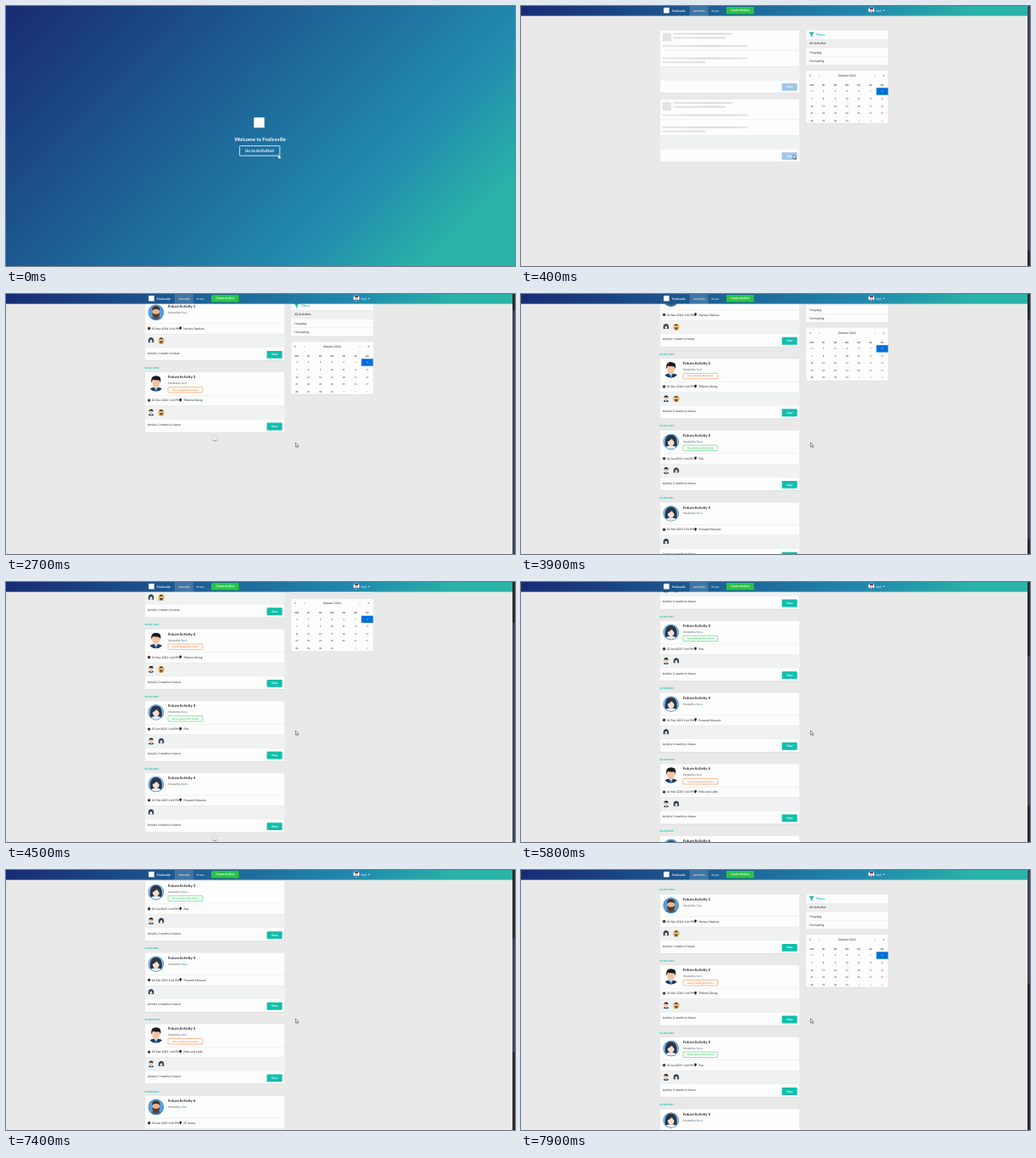
Animation, 600 px wide and 306 px high, one loop 8000 ms. Source, as an HTML page:

```html
<!DOCTYPE html>
<html lang="en">
<head>
<meta charset="utf-8">
<title>Activity feed</title>
<style>
  html, body { margin: 0; width: 100%; height: 100%; overflow: hidden; background: #e9e9e9; }
  svg { display: block; width: 600px; height: 306px; }
  text { font-family: Lato, "Open Sans", sans-serif; text-rendering: geometricPrecision; white-space: pre; }
</style>
</head>
<body>
<svg id="stage" viewBox="0 0 600 306" xmlns="http://www.w3.org/2000/svg"></svg>
<script>
(() => {
const W = 600, H = 306, PAGE_W = 597, LOOP = 8000;
const TEAL = '#10bfac', INK = '#222', LINK = '#4183c4', LINE = '#dcdddd';
const PAGE_AT = 350, FIRST_LOAD = 1500;

const stage = document.getElementById('stage');

function el(tag, attrs, parent = stage) {
  const node = document.createElementNS('http://www.w3.org/2000/svg', tag);
  for (const k in attrs) node.setAttribute(k, attrs[k]);
  parent.appendChild(node);
  return node;
}
const group = (parent, attrs = {}) => el('g', attrs, parent);
const rect = (p, x, y, width, height, fill, more = {}) =>
  el('rect', { x, y, width, height, fill, ...more }, p);
const circle = (p, cx, cy, r, fill, more = {}) => el('circle', { cx, cy, r, fill, ...more }, p);
const path = (p, d, fill, more = {}) => el('path', { d, fill, ...more }, p);
// y is the middle of the capitals
function text(p, x, y, str, size, fill = INK, weight = 400, anchor = 'start') {
  const node = el('text', { x, y: y + size * 0.36, 'font-size': size, fill,
    'font-weight': weight, 'text-anchor': anchor }, p);
  node.textContent = str;
  return node;
}
const show = (node, on) => { node.style.display = on ? '' : 'none'; };

// --- shared paint ---
const defs = el('defs', {});
function gradient(id, attrs, stops) {
  const g = el('linearGradient', { id, gradientUnits: 'userSpaceOnUse', ...attrs }, defs);
  for (const [offset, color] of stops) el('stop', { offset, 'stop-color': color }, g);
  return g;
}
// same geometry as a CSS gradient at 135deg
function diagonal(id, w, h) {
  const q = (w + h) / 4;
  gradient(id, { x1: w / 2 - q, y1: h / 2 - q, x2: w / 2 + q, y2: h / 2 + q },
    [[0, '#182a73'], [0.69, '#218aae'], [0.89, '#2ab3a8']]);
}
diagonal('hero', W, H);
diagonal('bar', PAGE_W, 11.6);
const shimmer = gradient('shimmer', { spreadMethod: 'repeat', y1: 0, y2: 0 },
  [[0, '#e3e3e3'], [0.15, '#dadada'], [0.3, '#e3e3e3'], [1, '#e3e3e3']]);
circle(el('clipPath', { id: 'round' }, defs), 0, 0, 1);

// --- avatars, drawn in a unit circle ---
function avatar(p, who, x, y, r, small) {
  const g = group(p, { transform: `translate(${x} ${y}) scale(${r})`, 'clip-path': 'url(#round)' });
  if (who === 'Ned') {
    path(g, 'M-.9 1C-.85 .55-.5 .45 0 .45S.85 .55 .9 1Z', '#1d3a66');
    path(g, 'M-.22 .4H.22L.12 .7 0 1-.12 .7Z', '#fff');
    path(g, 'M-.06 .55H.06L.1 1H-.1Z', '#2f86d0');
    el('ellipse', { cx: 0, cy: -0.1, rx: 0.47, ry: 0.6, fill: '#f3c5a0' }, g);
    path(g, 'M-.56-.1C-.7-.75-.35-1 .05-.97C.55-.98 .68-.6 .55-.1L.44-.4C.1-.4-.2-.45-.4-.5Z', '#1b1b22');
  } else if (who === 'Nora') {
    circle(g, 0, 0, 1, small ? '#c9d8e6' : '#8fc3ee');
    path(g, 'M-.72 .6C-.85-.3-.6-.85 0-.85S.85-.3 .72 .6Z', '#2c3646');
    path(g, 'M-.75 1C-.7 .6-.4 .5 0 .5S.7 .6 .75 1Z', '#e9eef4');
    el('ellipse', { cx: 0, cy: 0.02, rx: 0.42, ry: 0.52, fill: '#f6dfd2' }, g);
    path(g, 'M-.5 .05C-.45-.5-.1-.62 .15-.6C.4-.5 .5-.3 .5 .1C.3-.05 .2-.2 .1-.35C-.1-.15-.3-.05-.5 .05Z', '#2c3646');
  } else {
    circle(g, 0, 0, 1, small ? '#f0c77f' : '#5a9fdc');
    path(g, 'M-.8 1C-.75 .6-.4 .5 0 .5S.75 .6 .8 1Z', small ? '#b9a27c' : '#3f6286');
    el('ellipse', { cx: 0, cy: -0.05, rx: 0.45, ry: 0.6, fill: '#e9b78d' }, g);
    path(g, 'M-.47 0C-.5 .5-.25 .72 0 .72S.5 .5 .47 0C.3 .28-.3 .28-.47 0Z', '#5a3c28');
    path(g, 'M-.48-.2C-.55-.65-.3-.8 0-.8S.55-.65 .48-.2C.35-.5-.35-.5-.48-.2Z', '#4a3324');
  }
  if (who !== 'Ned' && !small)
    circle(g, 0, 0, 0.95, 'none', { stroke: '#4a8fd0', 'stroke-width': 0.1 });
}

// --- activity page ---
const page = group(stage);
rect(page, 0, 0, W, H, '#e9e9e9');
const scroller = group(page);

function box(p, x, y, w, h) {
  rect(p, x, y + 0.4, w, h, '#d0d1d1', { rx: 1 });
  rect(p, x, y, w, h, '#fdfdfd', { rx: 1, stroke: LINE, 'stroke-width': 0.3 });
}
const rule = (p, x, y, w) => rect(p, x, y, w, 0.35, LINE);

function button(p, x, y, w, h, label, fill) {
  rect(p, x, y, w, h, fill, { rx: 0.9 });
  text(p, x + w / 2, y + h / 2 - 0.1, label, 3.35, '#fff', 700, 'middle');
}

const CARD_X = 163.6, CARD_W = 165;
// host, place, month, label, guests
const items = [
  ['Max', 'Hartsey Stadium', 'Nov 2024', '', ['Nora', 'Max']],
  ['Ned', 'Tibbons Dining', 'Dec 2024', 'hosting', ['Ned', 'Max']],
  ['Nora', 'Pub', 'Jan 2025', 'going to', ['Ned', 'Nora']],
  ['Nora', 'Fenwold Museum', 'Feb 2025', '', ['Nora']],
  ['Ned', 'Mole and Ladle', 'Mar 2025', 'hosting', ['Ned', 'Nora']],
  ['Max', 'K7 Arena', 'Apr 2025', '', ['Nora', 'Max']],
  ['Nora', 'Pub', 'May 2025', 'going to', ['Ned', 'Nora']],
  ['Ned', 'Cinema', 'Jun 2025', 'hosting', ['Ned']]
];

function card([host, place, month, label, guests], i, y) {
  const g = group(scroller, { transform: `translate(0 ${y})` });
  const low = label ? 0 : -0.9;
  text(g, CARD_X - 0.2, -5.2, `02 ${month.toUpperCase()}`, 2.87, TEAL, 700);
  box(g, CARD_X, 0, CARD_W, 70.8 + low);
  avatar(g, host, 176.8, 13.3, 9.4);
  text(g, 191, 5.8, `Future Activity ${i + 1}`, 4.35, INK, 700);
  const by = text(g, 191, 13, 'Hosted by ', 3.35, '#555');
  el('tspan', { fill: LINK }, by).textContent = host;
  if (label) {
    const color = label === 'hosting' ? '#f2711c' : '#21c04f';
    rect(g, 191, 17.5, 40.8, 6.4, '#fff', { rx: 0.8, stroke: color, 'stroke-width': 0.5 });
    text(g, 211.4, 20.6, `You are ${label} this activity`, 2.5, color, 700, 'middle');
  }
  const b = group(g, { transform: `translate(0 ${low})` });
  rule(b, CARD_X, 27, CARD_W);
  circle(b, 168.7, 33, 1.65, '#1c1c1c');
  path(b, 'M168.7 32V33.1L169.4 33.5', 'none', { stroke: '#fff', 'stroke-width': 0.35 });
  text(b, 172, 33, `02 ${month} 1:44 PM`, 3.35);
  path(b, 'M205.7 34.9C205 33.6 204.3 33 204.3 32.3A1.4 1.4 0 0 1 207.1 32.3C207.1 33 206.4 33.6 205.7 34.9Z', '#1c1c1c');
  text(b, 209.4, 33, place, 3.35);
  rect(b, CARD_X, 39.4, CARD_W, 15.6, '#f0f2f2');
  rule(b, CARD_X, 39.4, CARD_W);
  rule(b, CARD_X, 55, CARD_W);
  guests.forEach((who, k) => avatar(b, who, 171 + k * 12, 47.3, 4.1, true));
  text(b, 166.8, 61.8, `Activity ${i + 1} month${i ? 's' : ''} in future`, 3.35);
  button(b, 307.5, 59.4, 18.1, 8.9, 'View', TEAL);
  return g;
}

let nextY = 28.4;
const cards = [], ends = [];
items.forEach((item, i) => {
  cards.push(card(item, i, nextY));
  const h = item[3] ? 70.8 : 69.9;
  ends.push(nextY + h);
  nextY += h + 13.8;
});

// loading skeletons
const skeletons = group(scroller);
for (const y of [28.4, 109.7]) {
  const g = group(skeletons, { transform: `translate(0 ${y})` });
  box(g, CARD_X, 0, CARD_W, 74);
  rect(g, CARD_X, 42.6, CARD_W, 16, '#f0f2f2');
  for (const d of [23.4, 42.6, 58.6]) rule(g, CARD_X, d, CARD_W);
  const bars = [[167, 3.5, 10, 9.8], [179.5, 3.4, 69.5, 2], [179.5, 8, 61.5, 2],
    [167, 17.8, 100, 2], [167, 32.2, 100, 2], [167, 36.8, 50, 2]];
  for (const [x, by, w, h] of bars) rect(g, x, by, w, h, 'url(#shimmer)');
  button(g, 307.5, 62.5, 18.1, 8.8, 'View', '#9ec8e8');
}

// filters
box(scroller, 336, 28.4, 97, 41.3);
path(scroller, 'M339.3 30.8H345.8L343.4 33.8V36.6L341.7 35.5V33.8Z', TEAL);
text(scroller, 348, 33.8, 'Filters', 3.6, TEAL, 700);
rect(scroller, 336.1, 39.3, 96.8, 9.7, '#efefef');
['All Activities', "I'm going", "I'm hosting"].forEach((s, i) => {
  rule(scroller, 336, 39 + i * 10.2, 97);
  text(scroller, 340, 44.2 + i * 10.25, s, 3.6);
});

// calendar
box(scroller, 336, 76, 97, 62.3);
[['«', 340.8], ['‹', 351.3], ['Oktober 2024', 384.2], ['›', 417], ['»', 427.4]].forEach(([s, x]) =>
  text(scroller, x, 81.5, s, s.length > 1 ? 3.35 : 4.2, INK, 400, 'middle'));
rect(scroller, 418.9, 96.3, 13.8, 8.4, '#006edc');
['MO', 'DI', 'MI', 'DO', 'FR', 'SA', 'SO'].forEach((s, i) => {
  const x = 342.8 + i * 13.83;
  text(scroller, x, 93.2, s, 2.5, INK, 700, 'middle');
  for (let r = 0; r < 5; r++) {
    const n = r * 7 + i;
    const day = n === 0 ? 30 : n > 31 ? n - 31 : n;
    const color = n === 6 ? '#fff' : n === 0 || n > 31 ? '#8a8a8a' : i > 4 ? '#d13030' : INK;
    text(scroller, x, 100.5 + r * 8.53, day, 2.7, color, 400, 'middle');
  }
});

// loader
const loader = group(scroller);
circle(loader, 0, 0, 3.6, 'none', { stroke: '#d3d3d3', 'stroke-width': 0.7 });
const spinner = path(loader, 'M-2.55-2.55A3.6 3.6 0 0 1 2.55-2.55', 'none',
  { stroke: '#767676', 'stroke-width': 0.7 });

// top bar
rect(page, 0, 0, PAGE_W, 11.6, 'url(#bar)');
rect(page, 199, 0, 21.6, 11.6, '#fff', { opacity: 0.16 });
for (const x of [165, 199, 220.6, 238.4]) rect(page, x, 0, 0.3, 11.6, '#fff', { opacity: 0.12 });
rect(page, 168.2, 1.9, 6.5, 6.5, '#fff');
text(page, 178, 5.3, 'Frolicsville', 3.4, '#fff', 700);
text(page, 203.2, 5.3, 'Activities', 3.4, '#fff');
text(page, 224.6, 5.3, 'Errors', 3.4, '#fff');
button(page, 242, 1, 32.6, 8.6, 'Create Activity', '#27c543');
circle(page, 413, 5, 3.5, '#fff');
avatar(page, 'Ned', 413, 5, 3.4, true);
text(page, 418.4, 5.3, 'Ned', 3.4, '#fff');
path(page, 'M426.6 4.7H429L427.8 6Z', '#fff');

// scroll bar
rect(page, PAGE_W, 0, 3, H, '#2a2b30');
const thumb = rect(page, PAGE_W, 0, 3, 10, '#42445c');

const arrow = path(page, 'M0 0V5L1.2 4 2 5.7 2.9 5.3 2.1 3.7H3.6Z', '#fff',
  { stroke: '#222', 'stroke-width': 0.5, 'stroke-linejoin': 'round' });

// --- welcome page ---
const welcome = group(stage);
rect(welcome, 0, 0, W, H, 'url(#hero)');
rect(welcome, 292.2, 131.2, 12.4, 12, '#fff');
text(welcome, 299.6, 156.7, 'Welcome to Frolicsville', 5.9, '#fff', 700, 'middle');
const goText = (fill, p) => text(p, 299, 170.3, 'Go to Activities!', 4.8, fill, 700, 'middle');
rect(welcome, 275.4, 164.6, 47.4, 11.6, 'none', { rx: 0.8, stroke: '#fff', 'stroke-width': 0.8 });
goText('#fff', welcome);
const hover = group(welcome);
rect(hover, 275, 164.2, 48.2, 12.4, '#fff', { rx: 1 });
goText('#333', hover);
path(welcome, 'M321 175.6Q321.6 174.9 322.1 175.6V176.6L323.8 177V178.4L323.2 179.4H321.4L320.2 177.6L321 177.3Z',
  '#fff', { stroke: '#3a4a5a', 'stroke-width': 0.25 });

// --- motion ---
const SCROLL = [[2200, 0], [2400, 20], [3700, 20], [3900, 36], [4050, 56.6], [5400, 56.6],
  [5800, 150.7], [6100, 225.3], [7300, 225.3], [7850, 0]];
const CURSOR = [[750, 321], [1000, 341.4]];
const LOADED = [[FIRST_LOAD, 2], [3200, 4], [4700, 6], [6500, 8]];
const SPIN = [[2250, 3200], [3900, 4700], [5900, 6500]];
const HOVER = [[20, 0], [120, 1]];

function along(steps, t) {
  if (t <= steps[0][0]) return steps[0][1];
  for (let i = 1; i < steps.length; i++) {
    const [t0, a] = steps[i - 1], [t1, b] = steps[i];
    if (t < t1) return a + (b - a) * (t - t0) / (t1 - t0);
  }
  return steps[steps.length - 1][1];
}

function draw(t) {
  const started = t >= PAGE_AT;
  show(welcome, !started);
  show(page, started);
  hover.setAttribute('opacity', along(HOVER, t));

  const count = LOADED.reduce((n, [at, k]) => (t >= at ? k : n), 0);
  cards.forEach((c, i) => show(c, i < count));
  show(skeletons, count === 0);
  const sweep = 166 + (t - PAGE_AT) / 2000 * 574;
  shimmer.setAttribute('x1', sweep);
  shimmer.setAttribute('x2', sweep + 287);

  const y = along(SCROLL, t);
  scroller.setAttribute('transform', `translate(0 ${-y})`);

  const end = ends[Math.max(count, 2) - 1];
  show(loader, SPIN.some(([a, b]) => t >= a && t < b));
  loader.setAttribute('transform', `translate(246 ${end + 6.5})`);
  spinner.setAttribute('transform', `rotate(${t / 600 * 360 % 360})`);

  const full = Math.max(326, end + 11.6);
  thumb.setAttribute('height', H * H / full);
  thumb.setAttribute('y', y * H / full);
  arrow.setAttribute('transform', `translate(${along(CURSOR, t)} 175)`);
}

function tick() {
  draw(performance.now() % LOOP);
  requestAnimationFrame(tick);
}
tick();
})();
</script>
</body>
</html>
```
